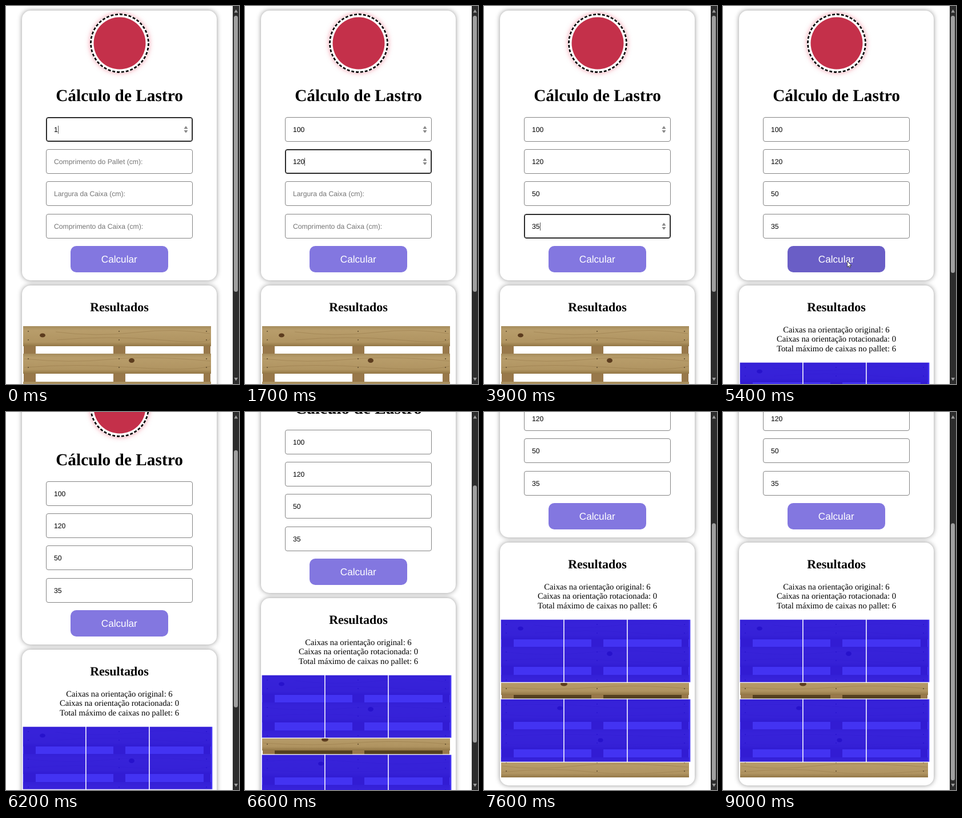
Write an HTML page that moves like this. It is 408 by 660 pixels and loops after 9.1 s.

```html
<!DOCTYPE html>
<html lang="pt">
<head>
<meta charset="utf-8">
<title>Cálculo de Lastro</title>
<style>
html, body { margin: 0; width: 100%; height: 100%; overflow: hidden; background: #fff; }
#stage { position: relative; width: 408px; height: 660px; overflow: hidden; background: #fff; text-rendering: geometricPrecision; }
#stage div, #stage svg { position: absolute; box-sizing: border-box; }
#page { left: 0; top: 0; width: 397px; height: 920px; }
.card { left: 28px; width: 341px; border-radius: 15px; background: #fff; box-shadow: 0 0 9px rgba(0,0,0,.42); }
#form { top: 8px; height: 471px; }
#results { top: 488px; }
.title, #text { left: 28px; width: 341px; text-align: center; color: #000; font-family: "Liberation Serif", "Times New Roman", serif; }
.title { font-weight: bold; }
#h1 { top: 139.5px; font-size: 29.33px; line-height: 34px; }
#h2 { top: 512.5px; font-size: 22px; line-height: 25px; }
#text { top: 557.5px; font-size: 14.67px; line-height: 16.5px; }
#logo { left: 146.5px; top: 13px; width: 104px; height: 104px; border-radius: 50%; box-shadow: 0 0 9px rgba(235,60,90,.5); }
.field, #button { font-family: "Liberation Sans", Arial, sans-serif; }
.field { left: 70px; width: 257px; height: 43px; padding-left: 13px; border: 1px solid #858585; border-radius: 4px; background: #fff; font-size: 12.22px; line-height: 42px; color: #000; white-space: pre; }
.field.empty { color: #757575; }
.field.focus { border-color: #101010; box-shadow: inset 0 0 0 1px #4a4a4a; }
.caret { top: 14px; width: 1px; height: 14px; background: #555; }
.spin { left: 240px; top: 14px; width: 8px; height: 13px; fill: #858585; }
#button { left: 113px; top: 419px; width: 170.5px; height: 46px; border-radius: 10px; background: #8377e0; color: #fff; font-size: 17.2px; line-height: 46px; text-align: center; }
#button.hover { background: #6a5ec6; }
#pallet { left: 29px; width: 333px; height: 276px; }
#bar { left: 397px; top: 0; width: 11px; height: 660px; background: #2c2c2c; }
#bar svg { left: 0; top: 0; fill: #9f9f9f; }
#thumb { left: 2px; top: 17px; width: 7px; border-radius: 4px; background: #9f9f9f; }
#arrow, #beam { left: 0; top: 0; }
</style>
</head>
<body>
<div id="stage">
  <div id="page">
    <div id="form" class="card"></div>
    <div id="results" class="card"></div>
    <svg id="logo" viewBox="-52 -52 104 104">
      <circle r="45.5" fill="#c4304a"/>
      <circle r="50.5" fill="none" stroke="#000" stroke-width="2.8" pathLength="320" stroke-dasharray="5 3"/>
    </svg>
    <div id="h1" class="title">Cálculo de Lastro</div>
    <div id="button">Calcular</div>
    <div id="h2" class="title">Resultados</div>
    <div id="text">Caixas na orientação original: 6<br>Caixas na orientação rotacionada: 0<br>Total máximo de caixas no pallet: 6</div>
    <svg id="pallet" viewBox="0 0 333 276">
      <defs>
        <linearGradient id="wood" x2="0" y2="1">
          <stop offset="0" stop-color="#a58c5c"/><stop offset=".2" stop-color="#b89d6b"/>
          <stop offset=".8" stop-color="#b09461"/><stop offset="1" stop-color="#927645"/>
        </linearGradient>
      </defs>
      <path fill="#98784a" d="M2 2h21v270H2zM159 2h21v270h-21zM317 2h12v270h-12z"/>
      <path fill="#54401f" d="M23 130h136v9H23zM180 130h137v9H180z"/>
      <g id="planks" fill="url(#wood)"></g>
      <path fill="none" stroke="#967848" stroke-opacity=".5" d="M58 10q70 9 140 1t130 2M60 24q90-8 180 0t88-2M3 57q80 8 150 1t176 3M3 72q90-7 190 0t136-2M3 119q90 6 160 0t166 2M3 151q80-6 160 1t166 0M3 166q90 7 326-1M3 204q100-6 326 2M3 218q90 5 326-1M3 256q60 8 130 0t196 2M3 267q80-9 150-1t176-2"/>
      <g fill="#5c3c1e">
        <ellipse cx="35" cy="16" rx="5" ry="3.5"/><ellipse cx="191" cy="60" rx="5" ry="4"/>
        <ellipse cx="111" cy="113" rx="6" ry="3.5"/><ellipse cx="104" cy="155" rx="5" ry="3.5"/>
        <ellipse cx="175" cy="211" rx="4.5" ry="3.5"/>
      </g>
      <g id="nails" fill="#5d4a2c"></g>
      <g id="boxes" fill="rgba(30,10,240,.83)" stroke="#fff" stroke-width="1.3"></g>
    </svg>
  </div>
  <div id="bar">
    <svg width="11" height="660"><path d="M2.5 11.5h6.5L5.7 6zM2.5 649h6.5L5.7 654.5z"/></svg>
    <div id="thumb"></div>
  </div>
  <svg id="arrow" width="10" height="14"><path d="M.7.7v10l2.4-2 1.6 3.6 1.6-.7-1.6-3.5h3.2z" fill="#fff" stroke="#222" stroke-width=".8"/></svg>
  <svg id="beam" width="7" height="12"><path d="M1 .6h5M3.5 .6v10.8M1 11.4h5" fill="none" stroke="#222"/></svg>
</div>
<script>
const LOOP = 9100, CALC = 5300;
const $ = id => document.getElementById(id);

// rows of planks, nails and boxes
const tops = [0, 48, 97, 139, 192, 241];
$('planks').innerHTML = tops.map(y => `<rect x="1" y="${y}" width="329" height="${y === 139 ? 40 : 35}"/>`).join('');
$('nails').innerHTML = tops.map(y => [10, 169, 322].map(x =>
  `<circle cx="${x}" cy="${y + 9}" r="1"/><circle cx="${x}" cy="${y + 24}" r="1"/>`).join('')).join('');
$('boxes').innerHTML = [0, 139].map(y => [0, 111, 222].map(x =>
  `<rect x="${x}" y="${y}" width="111" height="110.3"/>`).join('')).join('');

// each field: focus time and [time, value] keystrokes
const fields = [
  { hint: '', focus: 0, keys: [[0, '1'], [200, '10'], [400, '100']] },
  { hint: 'Comprimento do Pallet (cm):', focus: 900, keys: [[1200, '1'], [1400, '12'], [1700, '120']] },
  { hint: 'Largura da Caixa (cm):', focus: 1900, keys: [[2200, '5'], [2500, '50']] },
  { hint: 'Comprimento da Caixa (cm):', focus: 3500, keys: [[3700, '3'], [3900, '35']] }
];
const BLUR = 5200;
fields.forEach((f, i) => {
  f.el = document.createElement('div');
  f.el.className = 'field';
  f.el.style.top = Math.round(194 + i * 56.2) + 'px';
  f.el.innerHTML = '<span></span><div class="caret"></div><svg class="spin" viewBox="0 0 8 13"><path d="M.5 5.5h7L4 .5zM.5 8h7L4 12.8z"/></svg>';
  [f.label, f.caret, f.spin] = f.el.children;
  f.end = i < 3 ? fields[i + 1].focus : BLUR;
  $('page').insertBefore(f.el, $('button'));
});

// which field the mouse rests on
const hovered = t => t < 4600 ? 0 : t < 4700 ? 1 : t < 4800 ? 2 : t >= 5000 && t < 5100 ? 3 : -1;

function drawField(f, i, t) {
  const key = f.keys.filter(k => k[0] <= t).pop();
  const focus = t >= f.focus && t < f.end;
  const since = t - (key ? key[0] : f.focus);
  f.label.textContent = key ? key[1] : f.hint;
  f.el.className = 'field' + (key ? '' : ' empty') + (focus ? ' focus' : '');
  f.caret.style.left = 13 + (key ? key[1].length * 6.8 : 0) + 'px';
  f.caret.style.display = focus && since % 1000 < 500 ? '' : 'none';
  f.spin.style.display = focus || hovered(t) === i ? '' : 'none';
}

// linear interpolation through [time, value] points
function track(points, t) {
  if (t <= points[0][0]) return points[0][1];
  for (let i = 1; i < points.length; i++) {
    const [t0, a] = points[i - 1], [t1, b] = points[i];
    if (t < t1) return a + (b - a) * (t - t0) / (t1 - t0);
  }
  return points[points.length - 1][1];
}
const scrollPath = [[5700, 0], [5900, 18], [6200, 73], [6900, 231], [7000, 247], [7200, 260]];
const mouseX = [[4600, 177], [4700, 181], [5000, 203], [5200, 217]];
const mouseY = [[4600, 268], [4700, 318], [5000, 384], [5200, 445], [5700, 445], [5900, 449]];

function drawMouse(t, scroll) {
  const beam = hovered(t) > 0 || scroll > 60 && scroll < 85;
  const shown = t >= 4600 && t < 6600 && !(t >= 4800 && t < 5000);
  const move = `translate(${track(mouseX, t)}px,${track(mouseY, t)}px)`;
  for (const id of ['arrow', 'beam']) {
    $(id).style.transform = move;
    $(id).style.display = shown && beam === (id === 'beam') ? '' : 'none';
  }
}

function draw(t) {
  const done = t >= CALC, scroll = Math.round(track(scrollPath, t));
  fields.forEach((f, i) => drawField(f, i, t));
  $('button').className = t >= 5100 && scroll < 22 ? 'hover' : '';
  $('text').style.display = $('boxes').style.display = done ? '' : 'none';
  $('results').style.height = (done ? 424 : 361) + 'px';
  $('pallet').style.top = (done ? 622 : 559) + 'px';
  $('page').style.transform = `translateY(${-scroll}px)`;
  $('thumb').style.height = (done ? 449 : 482) + 'px';
  $('thumb').style.transform = `translateY(${scroll * .682}px)`;
  drawMouse(t, scroll);
}

const start = performance.now();
function tick() {
  const t = (performance.now() - start) % LOOP;
  draw(Math.floor(t / 100) * 100);
  requestAnimationFrame(tick);
}
tick();
</script>
</body>
</html>
```
